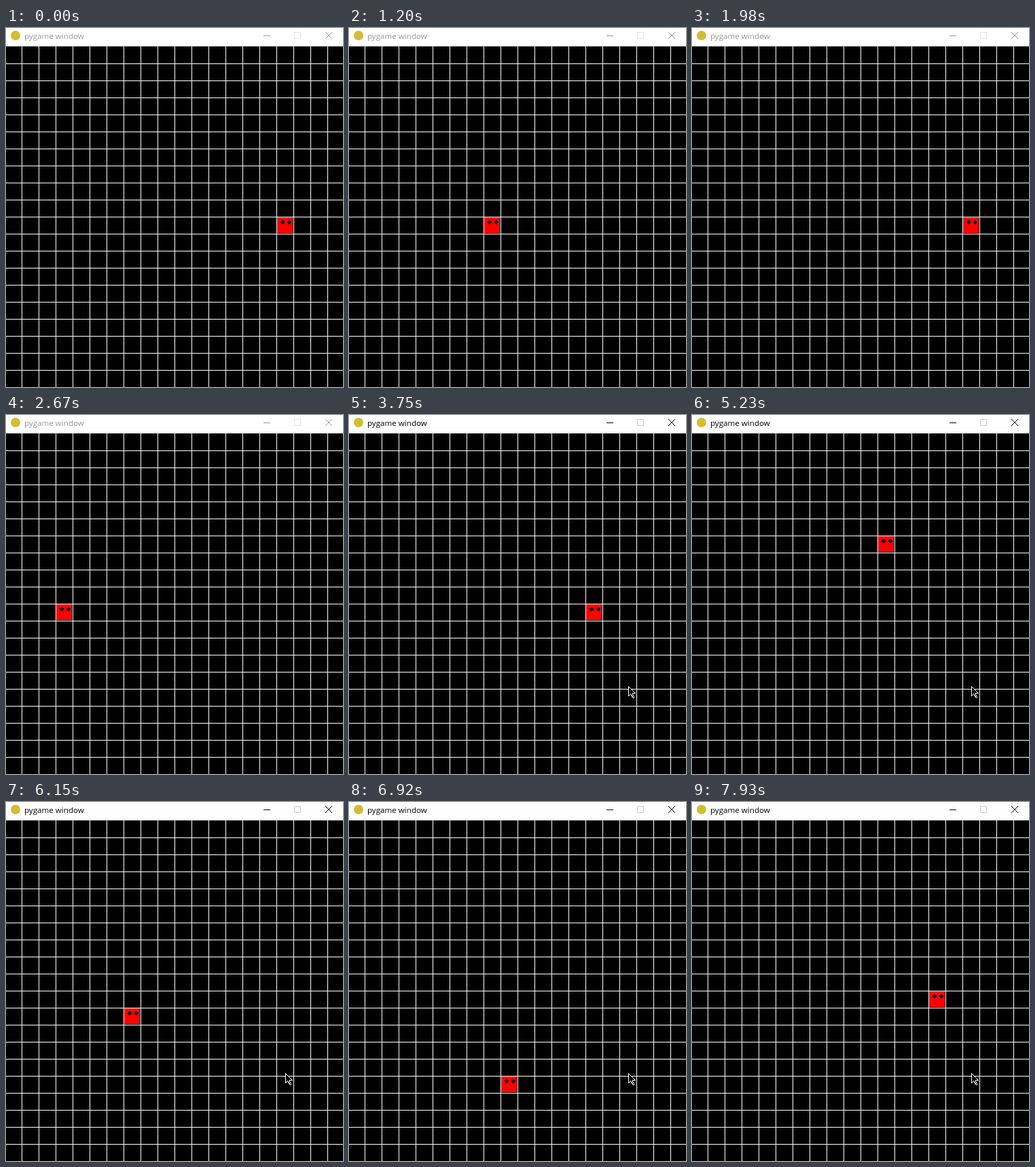
Animation, 496 px wide and 527 px high, one loop 8000 ms. Source, as an HTML page:

```html
<!DOCTYPE html>
<html lang="en">
<head>
<meta charset="utf-8">
<title>pygame window</title>
<style>
  html, body { margin: 0; width: 100%; height: 100%; overflow: hidden; background: #000; }
  svg { display: block; }
  .bar { --ink: #999; --faint: #e4e4e4; }
  .bar.active { --ink: #000; --faint: #ccc; }
  .bar text { font: 11.6px "Open Sans", "Noto Sans", sans-serif; fill: var(--ink); }
  .bar path { fill: none; stroke: var(--ink); }
  .bar .disabled { stroke: var(--faint); }
  .crisp { shape-rendering: crispEdges; }
</style>
</head>
<body>
<svg width="496" height="527" viewBox="0 0 496 527">
  <rect width="496" height="527"/>
  <path id="grid" class="crisp" stroke="#fff"/>
  <g id="snake" class="crisp">
    <rect x="1" y="1" width="23" height="23" fill="#f00"/>
    <path id="eye" d="M8 5h2v1h1v1h1v2h-1v1h-1v1h-2v-1h-1v-1h-1v-2h1v-1h1z"/>
    <use href="#eye" x="10"/>
  </g>
  <g id="bar" class="bar">
    <rect width="496" height="27" fill="#fff"/>
    <circle cx="14" cy="11" r="7" fill="#d3bd35"/>
    <text x="27" y="16">pygame window</text>
    <path class="crisp" d="M379 11.5h10"/>
    <path class="disabled crisp" d="M424.5 6.5h9v9h-9z"/>
    <path d="M470 6l10 10M480 6l-10 10"/>
  </g>
  <path id="cursor" class="crisp" stroke="#fff" d="M.5 .5v14l3-3 1 1 2 4 1 1 1-1-2-5v-1h4z"/>
</svg>
<script>
const LOOP = 8000, CELL = 25, COUNT = 20, LEFT = -2, TOP = 27;
const START = { col: 16, row: 10 };
const ACTIVATE = 3370;
const DIRS = { R: [1, 0], L: [-1, 0], U: [0, -1], D: [0, 1] };

// Bursts of moves: first time, last time, directions.
const BURSTS = [
  [70, 420, "RRRRR"], [590, 820, "RRRR"], [970, 1050, "RR"], [1200, 1430, "RRRR"],
  [1590, 1590, "R"], [1660, 1660, "RR"], [1830, 1830, "R"], [1980, 2140, "RRR"],
  [2290, 2520, "RRRR"], [2670, 2830, "RRR"], [2980, 3210, "RRRR"], [3370, 3600, "RRRR"],
  [3750, 3830, "RR"], [3980, 4210, "RRUU"], [4380, 4530, "UUU"], [4680, 4910, "LLLL"],
  [5080, 5310, "LLDD"], [5460, 5620, "DDD"], [5770, 6000, "DLLL"], [6150, 6310, "LLD"],
  [6460, 6620, "DDD"], [6770, 7000, "RRRR"], [7150, 7310, "RRU"], [7460, 7690, "UUUU"],
  [7860, 7930, "RR"]
];

const moves = BURSTS.flatMap(([from, to, dirs]) => [...dirs].map((d, i) => ({
  at: Math.floor((from + (to - from) * i / Math.max(1, dirs.length - 1)) / 10) * 10,
  dir: DIRS[d]
})));

const el = id => document.getElementById(id);
const snake = el("snake"), bar = el("bar"), cursor = el("cursor");
const place = (node, x, y) => node.setAttribute("transform", `translate(${x} ${y})`);
const wrap = n => (n + COUNT) % COUNT;

let lines = "";
for (let i = 1; i < COUNT; i++) {
  lines += `M${LEFT + i * CELL + .5} ${TOP}V527M0 ${TOP + i * CELL + .5}H496`;
}
el("grid").setAttribute("d", lines);

function drawSnake(t) {
  let { col, row } = START;
  for (const { at, dir } of moves) {
    if (at > t) break;
    col = wrap(col + dir[0]);
    row = wrap(row + dir[1]);
  }
  place(snake, LEFT + col * CELL, TOP + row * CELL);
}

// The pointer enters from below in four jumps and settles.
function drawCursor(t) {
  const step = Math.min(4, Math.floor((t - 3060) / 77));
  cursor.style.display = step < 0 ? "none" : "";
  const rest = (1 - step / 4) ** 2;
  place(cursor, Math.round(411 + 20 * rest), Math.round(398 + 118 * rest));
}

function frame(now) {
  const t = now % LOOP;
  drawSnake(t);
  drawCursor(t);
  bar.classList.toggle("active", t >= ACTIVATE);
  requestAnimationFrame(() => frame(performance.now()));
}
frame(0);
</script>
</body>
</html>
```
